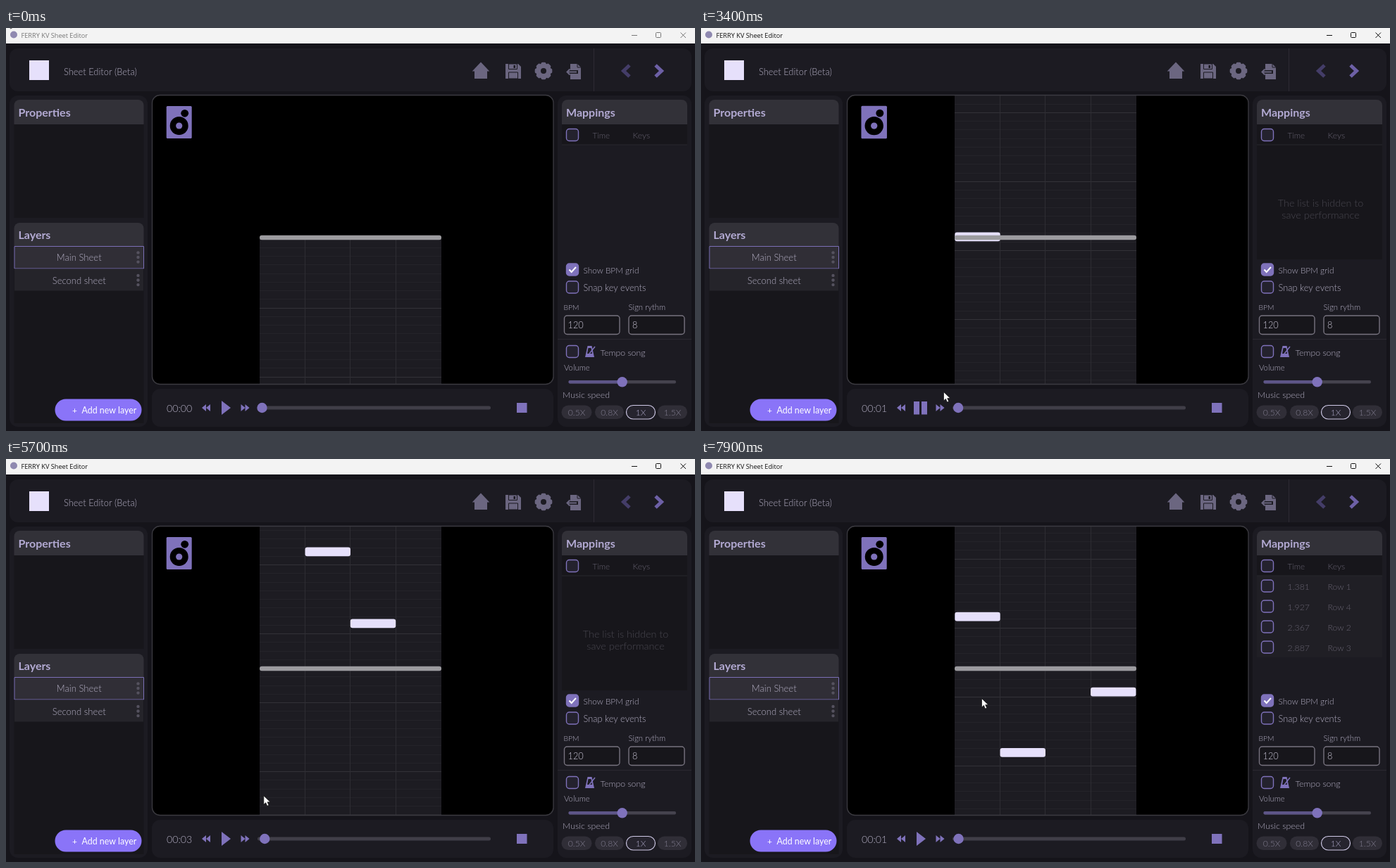
These frames come from a looping animation (978x573 px, 8 s). An HTML page with a canvas:

```html
<!DOCTYPE html>
<html lang="en">
<head>
<meta charset="utf-8">
<title>Sheet Editor</title>
<style>
html, body { margin: 0; width: 100%; height: 100%; overflow: hidden; background: #15141a; }
canvas { display: block; }
</style>
</head>
<body>
<canvas id="stage" width="978" height="573"></canvas>
<script>
const ctx = document.getElementById('stage').getContext('2d');
const LOOP = 8000, STEP = 100;
const SPEED = 196, BEAT = 98, ORIGIN = 300;
const PLAY = 1996, PAUSE = 5281, FOCUS = 1900;
const C = {
  back: '#15141a', panel: '#1c1b22', dark: '#17161b', head: '#323138', row: '#222128',
  accent: '#7f72bb', text: '#b3aec3', dim: '#65616f', icon: '#6b6680', title: '#b3aad3', pale: '#e6e0fb'
};
const NOTES = [[1.381, 0], [1.927, 3], [2.367, 1], [2.887, 2]];
const SCROLL = [[0, 0], [PLAY, 0], [2700, 138], [4200, 437], [5100, 604], [PAUSE, 639.5]];
const POINTER = [
  [0, 1, -14], [200, 2, -12], [600, 290, 170], [850, 425, 325], [1000, 388, 408],
  [1300, 301, 508], [1500, 304, 534], [2000, 304, 534], [2450, 344, 517],
  [5300, 344, 517], [5900, 376, 459], [6200, 395, 450], [6400, 395, 450], [7100, 398, 340]
];

// Linear interpolation through [time, ...values] keys.
function track(keys, t) {
  const i = keys.findIndex(k => k[0] > t);
  if (i < 0) return keys[keys.length - 1].slice(1);
  const a = keys[i - 1], b = keys[i], u = (t - a[0]) / (b[0] - a[0]);
  return a.slice(1).map((v, j) => v + (b[j + 1] - v) * u);
}

function scrollAt(t) {
  if (t < 6400) return track(SCROLL, t)[0];
  const u = Math.min(1, (t - 6400) / 1000);
  return 354 + 285.5 * (1 - u) ** 3;
}

function rect(x, y, w, h, fill) {
  ctx.fillStyle = fill;
  ctx.fillRect(x, y, w, h);
}

function box(x, y, w, h, r, fill, line, lw = 1) {
  ctx.beginPath();
  ctx.roundRect(x, y, w, h, r);
  if (fill) { ctx.fillStyle = fill; ctx.fill(); }
  if (line) { ctx.strokeStyle = line; ctx.lineWidth = lw; ctx.stroke(); }
}

function disc(x, y, r, fill) {
  ctx.beginPath();
  ctx.arc(x, y, r, 0, Math.PI * 2);
  ctx.fillStyle = fill;
  ctx.fill();
}

function poly(points, fill) {
  ctx.beginPath();
  points.forEach(p => ctx.lineTo(p[0], p[1]));
  ctx.closePath();
  ctx.fillStyle = fill;
  ctx.fill();
}

function path(points, color, width) {
  ctx.beginPath();
  points.forEach(p => ctx.lineTo(p[0], p[1]));
  ctx.strokeStyle = color;
  ctx.lineWidth = width;
  ctx.stroke();
}

function label(str, x, y, size, color, align = 'left', font = '300', family = 'Lato') {
  ctx.font = `${font} ${size}px ${family}, sans-serif`;
  ctx.textAlign = align;
  ctx.fillStyle = color;
  ctx.fillText(str, x, y);
}

function heading(str, x, y, w, h) {
  box(x, y, w, h, [8, 8, 0, 0], C.head);
  label(str, x + 6, y + h / 2 + 6, 16, C.title, 'left', 'bold');
}

function checkbox(y, on) {
  box(795.5, y - 8.5, 17, 17, 4, on ? C.accent : '#24222e', C.accent, 1.4);
  if (on) path([[799.5, y], [802.7, y + 3.5], [809, y - 3.5]], '#fff', 2);
}

function titleBar(focused) {
  const ink = focused ? '#111' : '#777';
  rect(0, 0, 978, 22, '#f3f3f3');
  disc(11, 9.5, 5, '#8f89b0');
  label('FERRY KV Sheet Editor', 21.5, 13.8, 9.2, ink, 'left', '400', 'Open Sans');
  path([[888, 10.5], [896, 10.5]], ink, 1);
  box(922.5, 6.5, 7, 7, 1, null, ink);
  path([[957.5, 6.5], [965, 14]], ink, 1);
  path([[965, 6.5], [957.5, 14]], ink, 1);
}

function gear(x, y) {
  for (let i = 0; i < 8; i++) {
    ctx.save();
    ctx.translate(x, y);
    ctx.rotate(i * Math.PI / 4);
    box(-3.5, -12.3, 7, 8, 2, C.icon);
    ctx.restore();
  }
  disc(x, y, 10.8, C.icon);
  disc(x, y, 4, C.panel);
}

function header() {
  box(5, 29, 968, 61, 12, C.panel);
  rect(834, 29, 1, 61, '#2d2b34');
  rect(33, 46, 28, 28, C.pale);
  label('Sheet Editor (Beta)', 82, 66.5, 12.9, C.text);

  poly([[674, 48.5], [686.3, 61.5], [683, 61.5], [683, 72], [665, 72], [665, 61.5], [661.7, 61.5]], C.icon);

  poly([[709, 51], [727, 51], [731, 55], [731, 72], [709, 72]], C.icon);
  box(713.5, 51, 12, 7.5, 0, null, C.panel);
  rect(720.5, 53, 2.5, 4, C.panel);
  box(713.5, 63, 13, 9, 0, null, C.panel);

  gear(763, 61);

  poly([[801, 51], [811, 51], [816, 56], [816, 73], [801, 73]], C.icon);
  path([[811, 51], [811, 56], [816, 56]], C.panel, 1);
  path([[812, 62.5], [797, 62.5]], C.panel, 5);
  path([[810, 62.5], [797, 62.5]], C.icon, 2);
  path([[800.5, 58.5], [796.5, 62.5], [800.5, 66.5]], C.icon, 2);

  path([[885, 53], [876.5, 61], [885, 69]], '#443d68', 5);
  path([[922, 53], [930.5, 61], [922, 69]], '#6d60a6', 5);
}

function layer(name, y, active) {
  if (active) box(12, y + .5, 183.5, 31.5, 0, '#302e36', '#7b6fb6');
  else rect(12, y, 183, 31, '#25242a');
  label(name, 103.7, y + 21, 13.1, C.text, 'center');
  for (let i = -1; i < 2; i++) disc(187.5, y + 16 + i * 6.6, 2.2, '#55525f');
}

function leftPanel() {
  box(5, 96, 196, 471, 12, C.panel);
  heading('Properties', 11.5, 102, 184, 35);
  rect(11.5, 137, 184, 133, C.dark);
  heading('Layers', 11.5, 277, 184, 33);
  rect(11.5, 310, 184, 252, C.dark);
  layer('Main Sheet', 310, true);
  layer('Second sheet', 342.5, false);
  box(69.5, 527.5, 123, 31, 15.5, '#8a74f8');
  label('+', 94, 548, 12, '#fff', 'left', '400');
  label('Add new layer', 107.5, 548, 12.4, '#fff', 'left', '400');
}

function speaker(scale) {
  ctx.save();
  ctx.translate(245.7, 134);
  ctx.scale(scale, scale);
  box(-18, -23, 36, 46, 1.5, C.accent);
  disc(0, 5, 13, '#000');
  disc(0, 5, 4.6, C.accent);
  disc(8, -12.7, 5.4, '#000');
  ctx.restore();
}

function sheet(t, scroll) {
  const time = scroll / SPEED, playing = t >= PLAY && t < PAUSE;
  ctx.save();
  box(207.5, 95.5, 569.5, 411, 11, '#000');
  ctx.clip();

  const zero = ORIGIN - scroll, top = Math.max(zero, 96);
  rect(360, top, 258, 507 - top, '#1d1c22');
  for (let i = Math.max(0, Math.ceil((96 - zero) * 8 / BEAT)); ; i++) {
    const y = zero + i * BEAT / 8;
    if (y > 506) break;
    rect(360, Math.round(y - .5), 258, 1, i % 8 ? '#242329' : '#333238');
  }
  for (let i = 1; i < 4; i++) rect(Math.floor(360.2 + i * 64.3), top, 1, 507 - top, '#2e2d33');

  const lag = playing ? 3.8 : 7.5;
  for (const [at, col] of NOTES) {
    if (time >= at || t >= PAUSE) box(360.3 + col * 64.25, zero + at * SPEED + lag - 6.4, 64.4, 12.7, 3, C.pale);
  }
  box(360, 294.8, 258, 6.4, 3, '#9c9b9f');

  const phase = time % .5;
  speaker(playing ? 1.02 + .05 * Math.cos((phase - .05) * 4 * Math.PI) : 1);
  ctx.restore();
  box(207.5, 95.5, 569.5, 411, 11, null, '#3b3a40', 1.3);
}

function player(t, time) {
  box(207, 513, 570, 54, 12, C.panel);
  label('00:0' + Math.floor(time), 228, 545.5, 14.2, C.text);
  for (const x of [278, 284]) poly([[x, 540], [x + 6, 535], [x + 6, 545]], C.accent);
  for (const x of [333.5, 339.5]) poly([[x, 535], [x + 6, 540], [x, 545]], C.accent);
  if (t >= PLAY && t < PAUSE) {
    rect(302, 531, 8, 18.5, C.accent);
    rect(313, 531, 8, 18.5, C.accent);
  } else poly([[306, 530], [319, 540], [306, 550]], C.accent);
  box(357, 537.5, 331, 5, 2.5, '#403e48');
  disc(363.5 + time * 1.15, 540, 7.2, C.accent);
  rect(725, 533, 14.5, 14, C.accent);
}

function mappings(t) {
  heading('Mappings', 789, 102, 178, 35);
  rect(789, 137, 178, 29, C.dark);
  if (t >= PLAY && t < 5900) rect(789, 166, 178, 163, C.dark);
  if (t >= 3000 && t < 5800) {
    label('The list is hidden to', 879.5, 254, 14.4, '#48464f', 'center');
    label('save performance', 879.5, 271, 14.4, '#48464f', 'center');
  }
  if (t >= 6100) {
    rect(789, 166, 178, 116, '#201f25');
    NOTES.forEach(([at, col], i) => {
      const y = 181 + i * 29;
      checkbox(y - .5, false);
      label(at.toFixed(3), 832.5, y + 4.5, 12.3, C.dim);
      label('Row ' + (col + 1), 889.5, y + 4.5, 12.2, C.dim);
    });
  }
  rect(789, 165.5, 178, 1, '#29282f');
  checkbox(152, false);
  label('Time', 832.5, 156.5, 11.6, C.dim);
  label('Keys', 889.5, 156.5, 12.2, C.dim);
}

function metronome() {
  poly([[825.5, 452], [831.5, 452], [835, 468], [822, 468]], C.accent);
  poly([[826.5, 455], [830.5, 455], [832, 463], [825, 463]], C.panel);
  path([[828, 463], [836, 453]], C.accent, 1.5);
}

function rightPanel(t) {
  box(783, 96, 190, 471, 12, C.panel);
  mappings(t);
  checkbox(343.5, true);
  label('Show BPM grid', 819.5, 348.5, 11.8, C.text);
  checkbox(368.5, false);
  label('Snap key events', 819.5, 374, 12.8, C.text);
  label('BPM', 791.5, 401, 10.4, C.text);
  label('Sign rythm', 883.5, 401, 11.4, C.text);
  box(792.5, 409, 78.5, 26.5, 4, C.dark, '#77737f', 1.4);
  box(884, 409, 79, 26.5, 4, C.dark, '#77737f', 1.4);
  label('120', 797.5, 427, 12.8, '#c9c5d6');
  label('8', 889, 427, 12.8, '#c9c5d6');
  rect(783, 442, 190, 1, '#2b2931');

  checkbox(460, false);
  metronome();
  label('Tempo song', 843.5, 466, 12.3, C.text);
  label('Volume', 792, 487, 11.3, C.text);
  box(798.5, 501, 152.5, 4.5, 2, '#45434e');
  box(798.5, 501, 76, 4.5, 2, '#5d5588');
  disc(874.7, 503.3, 7.2, C.accent);
  label('Music speed', 790, 525.5, 12.4, C.text);
  [['0.5X', 788.5, 43], ['0.8X', 836, 41], ['1X', 880.5, 41], ['1.5X', 925, 42]].forEach(([name, x, w], i) => {
    const on = i === 2;
    box(x, 536.5, w, 19.5, 9.7, on ? '#26242e' : '#302e37', on ? '#cfc9e6' : null, 1.2);
    label(name, x + w / 2, 551, 12.2, on ? '#aaa4c4' : '#817d90', 'center');
  });
}

function pointer([x, y]) {
  ctx.save();
  ctx.translate(x, y);
  const shape = [[.5, .5], [.5, 13], [3.4, 10.3], [5.4, 15], [7.7, 14], [5.7, 9.5], [9.8, 9.5]];
  poly(shape, '#fff');
  path([...shape, shape[0]], '#111', .7);
  ctx.restore();
}

function draw(t) {
  const scroll = scrollAt(t);
  rect(0, 0, 978, 573, C.back);
  titleBar(t >= FOCUS);
  header();
  leftPanel();
  sheet(t, scroll);
  player(t, scroll / SPEED);
  rightPanel(t);
  pointer(track(POINTER, t));
}

const start = performance.now();
function tick() {
  const t = (performance.now() - start) % LOOP;
  draw(Math.floor(t / STEP) * STEP);
  requestAnimationFrame(tick);
}
tick();
</script>
</body>
</html>
```
